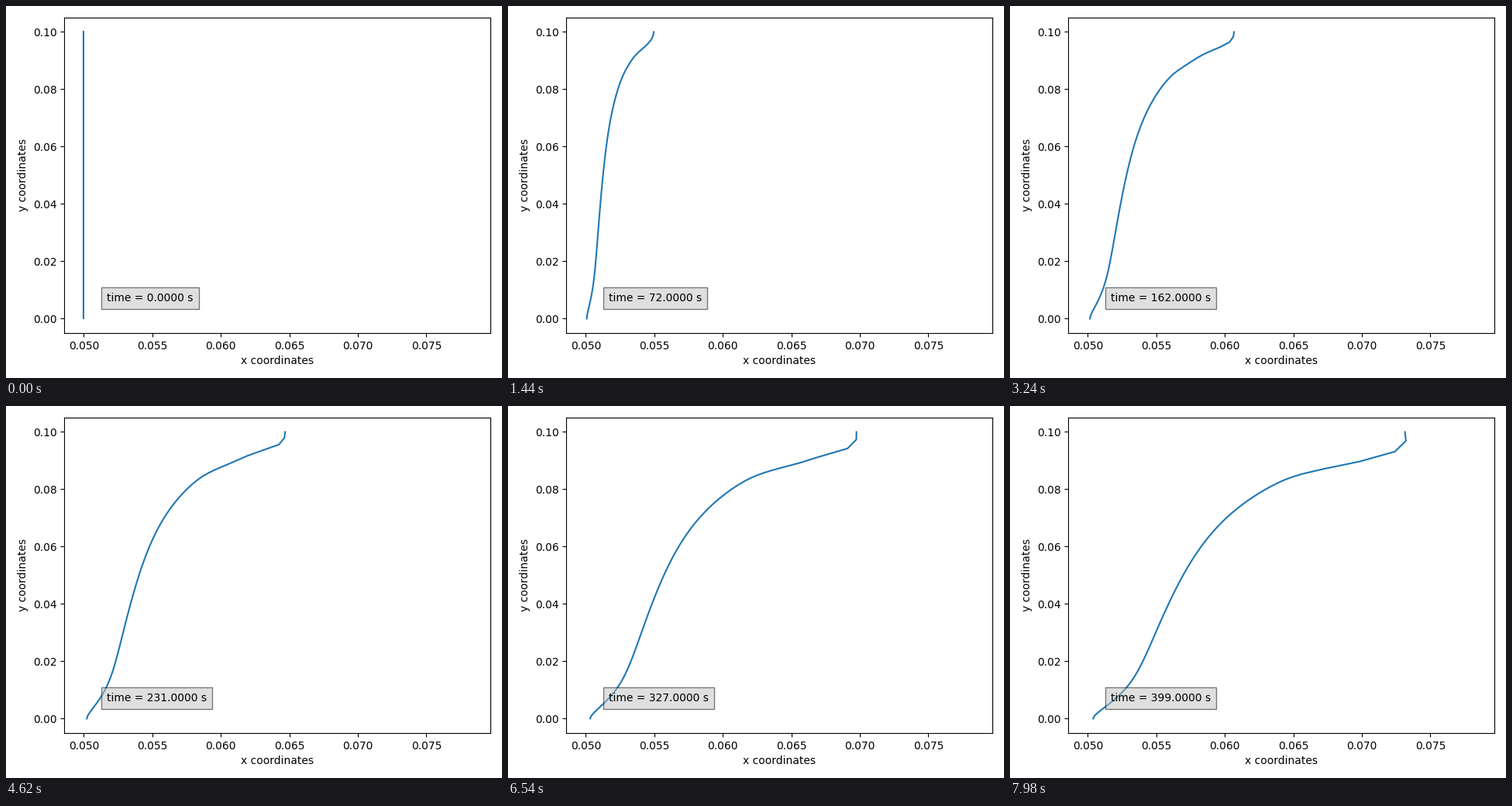
Animation of 640x480 px, one loop 8000 ms. Source, as a matplotlib script:

```python
import numpy as np
import matplotlib.pyplot as plt
from matplotlib.animation import FuncAnimation

INTERVAL = 20        # ms per tick
TICKS = 400          # 8 s loop
HOLD = 3             # ticks per simulation step
STEP = 3.0           # simulated seconds per step
T_END = 399.0

X0 = 0.05            # starting position of the line
MARGIN = 0.001413    # 5 % of the x range
PX_X, PX_Y = 17680.0, 3700.0   # pixels per data unit
DEPTH = 370.0        # lid to floor in pixels
START = np.linspace(0, DEPTH, 101)   # particle depths at rest


def sink(s, t):
    """How far a particle from depth s has moved down, in pixels."""
    q = (s / 21) ** 1.3
    return 38 * (t / T_END) ** 1.3 * 2 * q / (1 + q * q) * (1 - s / DEPTH)


def drift(d, t):
    """Mean speed to the right at depth d, in pixels per second."""
    height = DEPTH - d
    floor = np.tanh(np.hypot(height, 5) / 33)
    core = (0.46 - 0.00095 * d) * floor
    layer = 0.73 * np.exp(-d / 54)
    step = 0.13 / (1 + np.exp((d - 24) / 4.5))
    bulge = 0.00023 * t * np.exp(-((d - 36) / 14) ** 2)
    flow = core + layer + step + bulge
    # Particles near the lid cannot outrun it.
    lid = 1.261 - 0.00059 * t + 4e-6 * (t - 330) * d
    n = 40
    return (flow ** -n + lid ** -n) ** (-1 / n)


def shape(t):
    """Data coordinates of the material line at time t."""
    d = START + sink(START, t)
    return X0 + drift(d, t) * t / PX_X, 0.1 - d / PX_Y


fig, ax = plt.subplots(figsize=(6.4, 4.8), dpi=100)
fig.subplots_adjust(left=75.42 / 640, right=625 / 640,
                    bottom=58.08 / 480, top=465 / 480)
ax.set_xlim(X0 - MARGIN, X0 + 21 * MARGIN)
ax.set_ylim(-0.005, 0.105)
ax.set_xlabel("x coordinates")
ax.set_ylabel("y coordinates")
line, = ax.plot([], [], color="C0", lw=1.5)
label = ax.text(0.1, 0.1, "", transform=ax.transAxes,
                bbox=dict(facecolor="silver", alpha=0.5, pad=5))


def update(tick):
    t = tick // HOLD * STEP
    line.set_data(*shape(t))
    label.set_text(f"time = {t:.4f} s")
    return line, label


def init():
    return update(0)


anim = FuncAnimation(fig, update, frames=TICKS, init_func=init,
                     interval=INTERVAL, repeat=True, repeat_delay=0)
plt.show()
```
